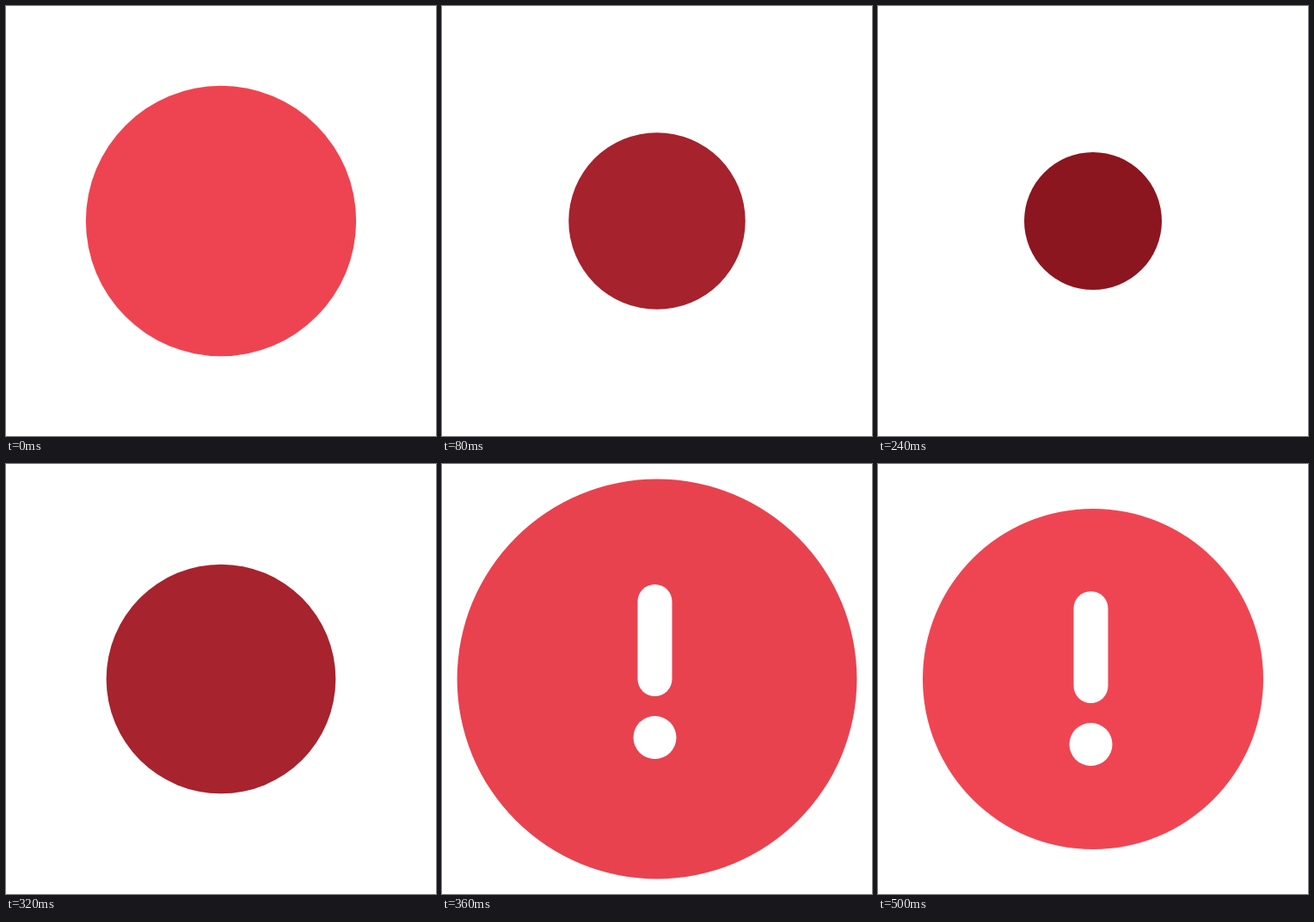
Animation, 500 px wide and 500 px high, one loop 1.2 s. Source, as an HTML page without scripts:

```html
<!DOCTYPE html>
<html lang="en">
<head>
<meta charset="utf-8">
<title>Alert</title>
<style>
  html, body {
    margin: 0;
    height: 100%;
    overflow: hidden;
    background: #fff;
  }
  svg {
    display: block;
    width: 100%;
    height: 100%;
  }
  .disc { animation: size 1200ms linear infinite, tint 1200ms linear infinite; }
  .mark { fill: #fff; animation: drop 1200ms linear infinite; }

  @keyframes size {
    0% { r: 158px; animation-timing-function: ease-out; }
    12.92% { r: 80px; }
    23.333% { r: 80px; animation-timing-function: cubic-bezier(.585, 0, .345, 1); }
    31.667% { r: 238px; }
    33.333% { r: 238px; animation-timing-function: cubic-bezier(.33, 0, .67, 1); }
    41.667%, 100% { r: 198px; }
  }
  @keyframes tint {
    0% { fill: #ef4552; animation-timing-function: ease-out; }
    12.33% { fill: #8c161f; }
    23.333% { fill: #8c161f; animation-timing-function: cubic-bezier(.585, 0, .345, 1); }
    32.333%, 100% { fill: #ef4552; }
  }
  @keyframes drop {
    0% { transform: translateY(-400px); }
    23.333% { transform: translateY(-400px); animation-timing-function: cubic-bezier(.585, 0, .345, 1); }
    33% { transform: translateY(38.5px); }
    33.333% { transform: translateY(38.5px); animation-timing-function: cubic-bezier(.33, 0, .67, 1); }
    41.667%, 100% { transform: translateY(0); }
  }
</style>
</head>
<body>
<svg viewBox="0 0 500 500">
  <circle class="disc" cx="250" cy="250" r="158" fill="#ef4552"/>
  <g class="mark">
    <rect x="227.5" y="148" width="40" height="130" rx="20"/>
    <circle cx="247.5" cy="326" r="25"/>
  </g>
</svg>
</body>
</html>
```
